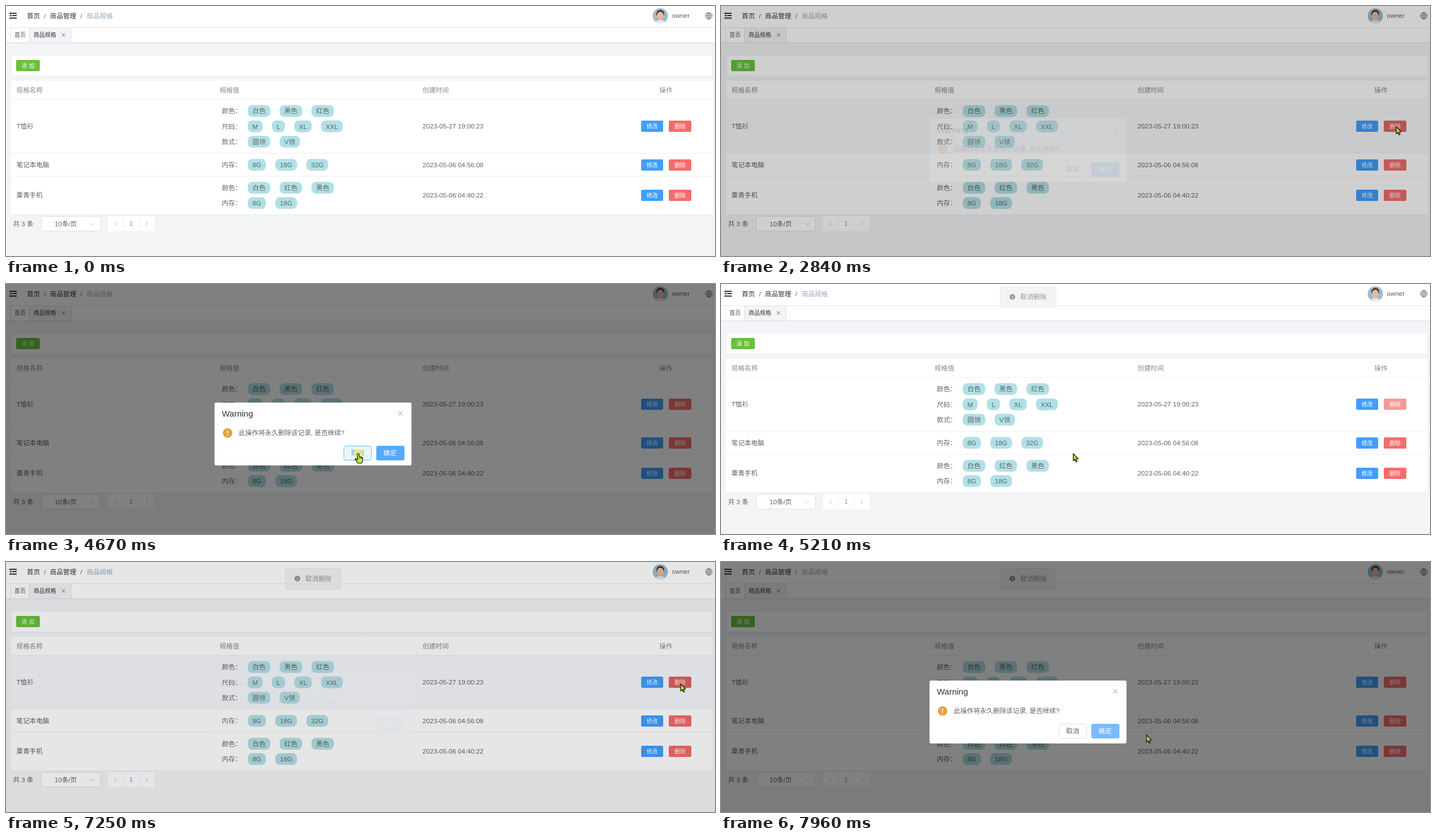
Write an HTML page with a canvas that moves like this. It is 1258 by 445 pixels and loops after 8 s.

```html
<!DOCTYPE html>
<html lang="zh-CN">
<head>
<meta charset="utf-8">
<title>商品规格</title>
<style>
html, body { margin: 0; width: 100%; height: 100%; overflow: hidden; background: #f3f4f6; }
canvas { display: block; width: 1258px; height: 445px; }
</style>
</head>
<body>
<canvas id="stage"></canvas>
<script>
const W = 1258, H = 445, LOOP = 8000, FS = 11.65;
const FAMILY = '"Liberation Sans", "Noto Sans CJK SC", "Noto Sans CJK", sans-serif';
const INK = '#606266', BLUE = '#409eff', BLUE_LIGHT = '#79bbff', RED = '#f56c6c';
const dpr = window.devicePixelRatio || 1;

function prepare(canvas) {
  canvas.width = W * dpr;
  canvas.height = H * dpr;
  const ctx = canvas.getContext('2d');
  ctx.scale(dpr, dpr);
  return ctx;
}
const main = prepare(document.getElementById('stage'));
const layerCanvas = document.createElement('canvas');
const layer = prepare(layerCanvas);
let g = main;

// Timing helpers
const clamp = v => Math.max(0, Math.min(1, v));
const ramp = (t, start, dur) => clamp((t - start) / dur);
const smooth = u => u * u * (3 - 2 * u);
const lerp = (a, b, u) => a + (b - a) * u;
const within = (t, spans) => spans.some(([a, b]) => t >= a && t < b);

// CSS "ease": cubic-bezier(.25, .1, .25, 1)
function ease(x) {
  const bez = (a, b, s) => 3 * a * s * (1 - s) ** 2 + 3 * b * s * s * (1 - s) + s ** 3;
  let lo = 0, hi = 1;
  for (let i = 0; i < 20; i++) {
    const mid = (lo + hi) / 2;
    if (bez(.25, .25, mid) < x) lo = mid; else hi = mid;
  }
  return bez(.1, 1, lo);
}

function mix(a, b, u) {
  const part = (c, i) => parseInt(c.slice(i, i + 2), 16);
  return 'rgb(' + [1, 3, 5].map(i => Math.round(lerp(part(a, i), part(b, i), u))) + ')';
}

// Colour that blends to each key within 100 ms
function keyedColor(keys, t) {
  let i = 0;
  while (i + 1 < keys.length && keys[i + 1][0] <= t) i++;
  return i ? mix(keys[i - 1][1], keys[i][1], ramp(t, keys[i][0], 100)) : keys[0][1];
}

// Drawing helpers
function text(str, x, y, color = INK, size = FS, align = 'left', weight = 400) {
  g.font = `${weight} ${size}px ${FAMILY}`;
  g.textAlign = align;
  g.fillStyle = color;
  g.fillText(str, x, y + size * .37);
}

function rect(x, y, w, h, color) {
  g.fillStyle = color;
  g.fillRect(x, y, w, h);
}

function box(x, y, w, h, r, fill, border) {
  g.beginPath();
  if (border) g.roundRect(x + .5, y + .5, w - 1, h - 1, r);
  else g.roundRect(x, y, w, h, r);
  g.fillStyle = fill;
  g.fill();
  if (border) {
    g.strokeStyle = border;
    g.lineWidth = 1;
    g.stroke();
  }
}

function disc(x, y, r, color) {
  g.beginPath();
  g.arc(x, y, r, 0, 7);
  g.fillStyle = color;
  g.fill();
}

function line(points, color, width = 1) {
  g.beginPath();
  points.forEach(([x, y]) => g.lineTo(x, y));
  g.strokeStyle = color;
  g.lineWidth = width;
  g.stroke();
}

function cross(x, y, r, color) {
  line([[x - r, y - r], [x + r, y + r]], color);
  line([[x - r, y + r], [x + r, y - r]], color);
}

function button(x, y, w, label, color) {
  box(x, y, w, 20, 2.5, color);
  text(label, x + w / 2, y + 10, '#ffffff', 10, 'center', 500);
}

// Page data
const ROWS = [
  { top: 166, end: 262, name: 'T恤衫', date: '2023-05-27 19:00:23', specs: [
    ['颜色：', '白色', '黑色', '红色'], ['尺码：', 'M', 'L', 'XL', 'XXL'], ['款式：', '圆领', 'V领']],
    hover: [[834, 2800], [5916, 7255]] },
  { top: 262, end: 303, name: '笔记本电脑', date: '2023-05-06 04:56:08', specs: [
    ['内存：', '8G', '18G', '32G']],
    hover: [[782, 834], [5290, 5916]] },
  { top: 303, end: 371, name: '粟青手机', date: '2023-05-06 04:40:22', specs: [
    ['颜色：', '白色', '红色', '黑色'], ['内存：', '8G', '18G']],
    hover: [[683, 782]] }
];
const EDIT_KEYS = [[0, BLUE], [1720, BLUE_LIGHT], [1810, BLUE], [6220, BLUE_LIGHT], [6285, BLUE]];
const DELETE_KEYS = [[0, RED], [1830, '#f89898'], [2690, '#c45656'], [2775, RED],
  [4980, '#f89898'], [7045, '#c45656'], [7200, RED]];
const CONFIRM_KEYS = [[0, BLUE_LIGHT], [4610, BLUE], [7000, BLUE_LIGHT]];

function drawHeader() {
  rect(0, 0, W, 65, '#ffffff');
  rect(0, 38, W, 1, '#e2e5ec');
  rect(0, 65, W, 1, '#d8dce5');

  const dark = '#2b2f3a';
  rect(6, 12, 13, 2, dark);
  rect(11, 16, 8, 2, dark);
  rect(6, 20.5, 13, 2, dark);
  g.beginPath();
  g.moveTo(6, 17); g.lineTo(9.5, 14.8); g.lineTo(9.5, 19.2);
  g.fill();

  text('首页', 37, 17.5, '#303133');
  text('/', 67.5, 17.5, '#606266');
  text('商品管理', 78, 17.5, '#303133');
  text('/', 132, 17.5, '#606266');
  text('商品规格', 143, 17.5, '#97a8be');

  g.save();
  g.beginPath();
  g.arc(1161, 17.5, 13.5, 0, 7);
  g.clip();
  rect(1147, 3, 28, 30, '#9dbacb');
  g.beginPath();
  g.ellipse(1161, 32, 10, 7, 0, 0, 7);
  g.fillStyle = '#dfe8f2';
  g.fill();
  disc(1161, 14, 7, '#35302f');
  g.beginPath();
  g.ellipse(1161, 17.5, 6, 7.5, 0, 0, 7);
  g.fillStyle = '#e8b795';
  g.fill();
  g.restore();
  text('owner', 1181.5, 17, '#5a5e66');

  g.strokeStyle = '#6b6f78';
  g.lineWidth = .9;
  for (const rx of [6, 2.8]) {
    g.beginPath();
    g.ellipse(1247, 17.5, rx, 6, 0, 0, 7);
    g.stroke();
  }
  line([[1241, 17.5], [1253, 17.5]], '#6b6f78', .9);
  line([[1247, 11.5], [1247, 23.5]], '#6b6f78', .9);
  for (const y of [14.5, 20.5]) line([[1242, y], [1252, y]], '#6b6f78', .7);

  rect(42, 39, 74, 26, '#f3f4f6');
  for (const x of [8, 41, 115]) rect(x, 39, 1, 26, '#dfe2e8');
  text('首页', 15, 51.5, '#495060', 10);
  text('商品规格', 49, 51.5, '#303133', 10);
  cross(102, 51.5, 2.8, '#5a5e66');
}

function drawSpecs(row) {
  const mid = (row.top + row.end) / 2 + .2;
  row.specs.forEach(([label, ...values], i) => {
    const y = mid + (i - (row.specs.length - 1) / 2) * 27.3;
    text(label, 383, y);
    let x = 429;
    for (const value of values) {
      g.font = `400 ${FS}px ${FAMILY}`;
      const w = g.measureText(value).width + 16.6;
      box(x, y - 10.5, w, 21, 8, '#b0e0e6');
      text(value, x + 8.3, y);
      x += w + 16.6;
    }
  });
}

function drawTable(t) {
  box(9, 87, 1245, 38, 1, '#ffffff', '#ebeef5');
  button(18, 96, 42, '添 加', '#67c23a');

  rect(9, 133, 1245, 238, '#ffffff');
  const head = '#85888e';
  text('规格名称', 18.5, 149.5, head, FS, 'left', 500);
  text('规格值', 379, 149.5, head, FS, 'left', 500);
  text('创建时间', 739, 149.5, head, FS, 'left', 500);
  text('操作', 1171, 149.5, head, FS, 'center', 500);

  ROWS.forEach((row, i) => {
    const shade = Math.max(...row.hover.map(([a, b]) => ease(ramp(t, a, 250)) * (1 - ease(ramp(t, b, 250)))));
    rect(9, row.top, 1245, row.end - row.top, mix('#ffffff', '#f5f7fa', shade));
    rect(9, row.top - .5, 1245, 1, '#ebeef5');
    const y = (row.top + row.end) / 2;
    text(row.name, 18.5, y);
    drawSpecs(row);
    text(row.date, 739, y);
    button(1127, Math.round(y - 10), 39, '修改', i ? BLUE : keyedColor(EDIT_KEYS, t));
    button(1176, Math.round(y - 10), 40, '删除', i ? RED : keyedColor(DELETE_KEYS, t));
  });
  rect(9, 371, 1245, 1, '#ebeef5');
}

function drawPager() {
  text('共 3 条', 12.5, 387.5);
  box(62, 374, 106, 27, 3, '#ffffff', '#dcdfe6');
  text('10条/页', 106, 387.5, INK, FS, 'center');
  line([[149, 386], [153, 390], [157, 386]], '#c0c4cc');
  for (const x of [181, 209, 237]) rect(x, 374, 26.5, 26.5, '#ffffff');
  line([[196, 384], [192.5, 387.5], [196, 391]], '#b4b8bf');
  text('1', 222, 387.5, BLUE, 10.8, 'center');
  line([[248, 384], [251.5, 387.5], [248, 391]], '#b4b8bf');
}

function drawNotice(t) {
  if (t < 5000) return;
  g.save();
  g.globalAlpha = ease(ramp(t, 5000, 300));
  g.translate(0, -38 * (1 - ease(ramp(t, 5000, 400))));
  box(495, 11, 100, 38, 3.3, '#f4f4f5', '#e9e9eb');
  disc(517, 29.5, 5, '#909399');
  text('i', 517, 29.5, '#ffffff', 8, 'center', 700);
  text('取消删除', 531, 29.5, '#909399');
  g.restore();
}

function drawDialog(t) {
  box(370, 211, 349.5, 112, 3.3, '#ffffff');
  text('Warning', 383, 230.5, '#303133', 15);
  cross(699.7, 230.3, 4, '#909399');
  disc(393.2, 265.2, 8.4, '#e6a23c');
  rect(392.4, 260.3, 1.7, 6, '#ffffff');
  disc(393.2, 269, 1.1, '#ffffff');
  text('此操作将永久删除该记录, 是否继续?', 413, 265);

  const hover = t < 7000 ? ramp(t, 3790, 100) : 0;
  const press = t < 7000 ? ramp(t, 4610, 100) : 0;
  const edge = press ? mix('#c6e2ff', BLUE, press) : mix('#dcdfe6', '#c6e2ff', hover);
  box(599, 288, 50, 26, 3.3, mix('#ffffff', '#ecf5ff', hover), edge);
  text('取消', 624, 301, mix(INK, BLUE, hover), FS, 'center');
  box(657, 288, 50, 26, 3.3, keyedColor(CONFIRM_KEYS, t));
  text('确定', 681.5, 301, '#ffffff', FS, 'center', 500);
}

function drawOverlay(t) {
  const p = t < 7000
    ? ease(ramp(t, 2770, 300)) * (1 - ease(ramp(t, 4980, 200)))
    : ease(ramp(t, 7205, 300));
  if (!p) return;
  rect(0, 0, W, H, `rgba(0,0,0,${.5 * p})`);
  layer.clearRect(0, 0, W, H);
  g = layer;
  drawDialog(t);
  g = main;
  g.save();
  g.globalAlpha = p * p;
  g.drawImage(layerCanvas, 0, -16.6 * (1 - p), W, H);
  g.restore();
}

// Pointer: time, x, y, linear approach
const PATH = [
  [480, 985, 450], [1000, 822, 212], [1230, 822, 212], [1930, 1198, 213],
  [2700, 1198, 213], [2770, 1198, 215], [3200, 1198, 215], [3860, 625, 302],
  [5270, 625, 302], [5740, 850, 268], [5790, 850, 268], [6390, 1197, 217],
  [7440, 1197, 217], [7820, 863, 297, true], [7960, 755, 308, true]
];
const HAND = [[1720, 2770], [3700, 4980], [6240, 7205]];
const PRESS = [[2690, 2770], [4640, 4980], [7045, 7200]];
const ARROW_SHAPE = [[0, 0], [0, 12.6], [2.9, 10], [5, 14.4], [7, 13.4], [5, 9.3], [9, 9]];
const HAND_SHAPE = [[-1.6, .8], [0, -.4], [1.6, .8], [1.9, 5.4], [6, 6.2], [8, 8], [7.6, 12.5],
  [6, 17], [-.5, 17], [-3, 13], [-5.5, 10], [-4.2, 8.6], [-1.2, 10.8]];

function pointerAt(t) {
  const i = PATH.findIndex(key => key[0] > t);
  if (i < 0) return PATH[PATH.length - 1].slice(1);
  const a = PATH[i - 1], b = PATH[i];
  const raw = (t - a[0]) / (b[0] - a[0]);
  const u = b[3] ? raw : smooth(raw);
  return [lerp(a[1], b[1], u), lerp(a[2], b[2], u)];
}

function drawPointer(t) {
  if (t < PATH[0][0]) return;
  const [x, y] = pointerAt(t);
  const hand = within(t, HAND);
  if (within(t, PRESS)) disc(x, y, 9, 'rgba(250,240,90,.65)');
  g.save();
  g.translate(x, y);
  g.beginPath();
  (hand ? HAND_SHAPE : ARROW_SHAPE).forEach(([px, py]) => g.lineTo(px, py));
  g.closePath();
  g.fillStyle = hand ? '#c8f03c' : '#b5e61d';
  g.fill();
  g.strokeStyle = '#111111';
  g.lineWidth = 1.2;
  g.lineJoin = 'round';
  g.stroke();
  if (hand) for (const px of [2, 4.2, 6.2]) line([[px, 6.4], [px, 9]], '#111111', .8);
  g.restore();
}

function draw(t) {
  rect(0, 0, W, H, '#f3f4f6');
  drawHeader();
  drawTable(t);
  drawPager();
  drawNotice(t);
  drawOverlay(t);
  drawPointer(t);
}

const start = performance.now();
function tick() {
  draw((performance.now() - start) % LOOP);
  requestAnimationFrame(tick);
}
tick();
</script>
</body>
</html>
```
